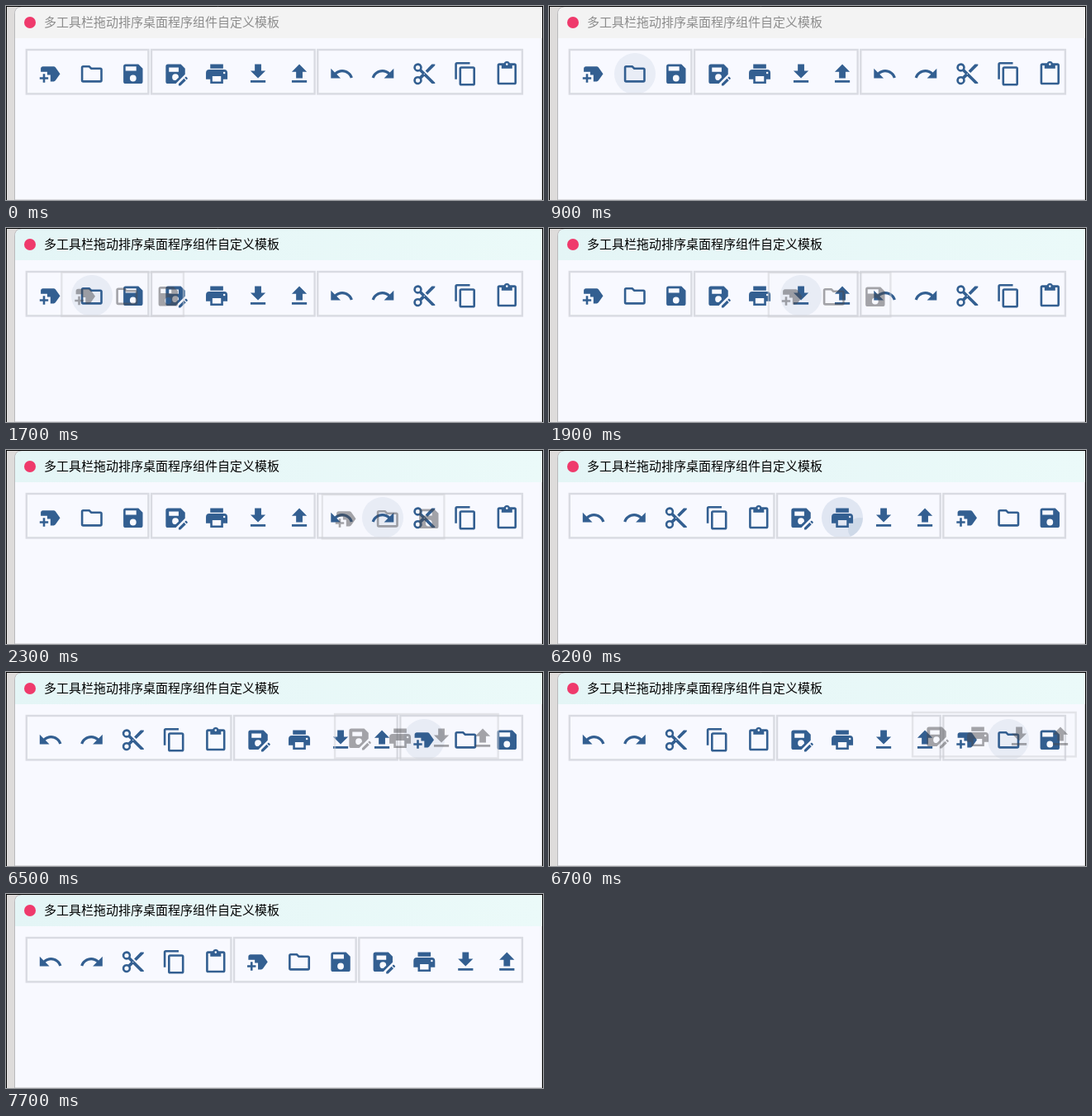
Animation, 650 px wide and 235 px high, one loop 8 s. Source, as an HTML page:

```html
<!DOCTYPE html>
<html lang="zh">
<head>
<meta charset="utf-8">
<style>
  html, body { margin: 0; width: 100%; height: 100%; overflow: hidden; background: #000; }
  svg { display: block; }
  #title { font: 15px "Noto Sans CJK SC", "Noto Sans CJK", sans-serif; }
  .box { fill: none; stroke: #d9dbe2; stroke-width: 2.4; }
  .icon { fill: #335f91; fill-rule: evenodd; }
  #ghost { opacity: .48; }
  #ghost .box { stroke: #cdced3; fill: rgba(0, 0, 0, .015); }
  #ghost .icon { fill: #48484c; }
</style>
</head>
<body>
<svg width="650" height="235" viewBox="0 0 650 235">
  <defs>
    <linearGradient id="tint">
      <stop stop-color="#e4f5f6"/>
      <stop offset="1" stop-color="#ebfaf9"/>
    </linearGradient>
    <clipPath id="hoverClip"><circle id="clipCircle" cy="82" r="25"/></clipPath>
  </defs>
  <path d="M1 1H649V235H1Z" fill="#dedcdb"/>
  <path d="M10.5 235V10Q10.5 1 19 1H649V235Z" fill="#f8f9ff" stroke="#b9b9bb"/>
  <path id="titleBar" d="M11 39V10Q11 1.5 19 1.5H649V39Z"/>
  <path d="M649.5 0V235M0 .5H650" stroke="#000"/>
  <circle cx="29" cy="20" r="7" fill="#ef3a6c"/>
  <text id="title" x="46" y="25">多工具栏拖动排序桌面程序组件自定义模板</text>
  <circle id="hover" cy="82" r="25" fill="#335f91"/>
  <g clip-path="url(#hoverClip)"><circle id="ripple" fill="#335f91" fill-opacity=".1"/></g>
  <g id="bars"></g>
  <g id="ghost"></g>
</svg>
<script>
const icons = {
  label: 'M21 12l-4.37 6.16c-.37.52-.98.84-1.63.84h-3v-6H9v-3H3V7c0-1.1.9-2 2-2h10c.65 0 1.26.31 1.63.84zM10 15H7v-3H5v3H2v2h3v3h2v-3h3z',
  folder: 'M9.17 6l2 2H20v10H4V6zM10 4H4a2 2 0 0 0-2 2v12a2 2 0 0 0 2 2h16a2 2 0 0 0 2-2V8a2 2 0 0 0-2-2h-8z',
  save: 'M17 3H5a2 2 0 0 0-2 2v14a2 2 0 0 0 2 2h14a2 2 0 0 0 2-2V7zM12 19a3 3 0 1 1 0-6 3 3 0 0 1 0 6zM15 9H5V5h10z',
  saveAs: 'M21 12.4V7l-4-4H5a2 2 0 0 0-2 2v14a2 2 0 0 0 2 2h7.4zM15 15l-.04.45L12.3 18H12a3 3 0 1 1 3-3zM6 6h9v4H6zM19.99 16.25l1.77 1.77L16.77 23H15v-1.77zM23.25 16.51l-.85.85-1.77-1.77.85-.85q.35-.3.71 0l1.06 1.06q.3.35 0 .71z',
  print: 'M19 8H5a3 3 0 0 0-3 3v6h4v4h12v-4h4v-6a3 3 0 0 0-3-3zM16 19H8v-5h8zM19 12a1 1 0 1 1 0-2 1 1 0 0 1 0 2zM18 3H6v4h12z',
  download: 'M5 20h14v-2H5zM19 9h-4V3H9v6H5l7 7z',
  upload: 'M5 20h14v-2H5zM5 10h4v6h6v-6h4l-7-7z',
  undo: 'M12.5 8c-2.65 0-5.05.99-6.9 2.6L2 7v9h9l-3.62-3.62c1.39-1.16 3.16-1.88 5.12-1.88 3.54 0 6.55 2.31 7.6 5.5l2.37-.78C21.08 11.03 17.15 8 12.5 8z',
  redo: 'M18.4 10.6C16.55 8.99 14.15 8 11.5 8c-4.65 0-8.58 3.03-9.96 7.22L3.9 16c1.05-3.19 4.05-5.5 7.6-5.5 1.95 0 3.73.72 5.12 1.88L13 16h9V7z',
  cut: 'M9.64 7.64A4 4 0 1 0 7.64 9.64L10 12l-2.36 2.36a4 4 0 1 0 2 2L12 14l7 7h3v-1zM6 8a2 2 0 1 1 0-4 2 2 0 0 1 0 4zM6 20a2 2 0 1 1 0-4 2 2 0 0 1 0 4zM12 12.5a.5.5 0 1 1 0-1 .5.5 0 0 1 0 1zM19 3l-6 6 2 2 7-7V3z',
  copy: 'M16 1H4a2 2 0 0 0-2 2v14h2V3h12zM19 5H8a2 2 0 0 0-2 2v14a2 2 0 0 0 2 2h11a2 2 0 0 0 2-2V7a2 2 0 0 0-2-2zM19 21H8V7h11z',
  paste: 'M19 2h-4.18a3 3 0 0 0-5.64 0H5a2 2 0 0 0-2 2v16a2 2 0 0 0 2 2h14a2 2 0 0 0 2-2V4a2 2 0 0 0-2-2zM12 2a1 1 0 1 1 0 2 1 1 0 0 1 0-2zM19 20H5V4h2v3h10V4h2z'
};
const toolbars = {
  A: ['label', 'folder', 'save'],
  B: ['saveAs', 'print', 'download', 'upload'],
  C: ['undo', 'redo', 'cut', 'copy', 'paste']
};

// Each step holds until the next one; drag = [toolbar, dx, dy], ripple = [x, y, radius]
const steps = [
  { at: 0, order: 'ABC' },
  { at: 900, order: 'ABC', hover: 104 },
  { at: 1500, order: 'ABC', hover: 104, ripple: [85, 95, 8] },
  { at: 1600, order: 'ABC', hover: 104, ripple: [85, 95, 16], drag: ['A', 8, 0] },
  { at: 1700, order: 'ABC', hover: 104, drag: ['A', 42.5, .5] },
  { at: 1800, order: 'ABC', hover: 205, drag: ['A', 136, 1] },
  { at: 1900, order: 'ABC', hover: 305, drag: ['A', 241, 1] },
  { at: 2000, order: 'ABC', hover: 406, drag: ['A', 308, 1] },
  { at: 2100, order: 'ABC', hover: 406, drag: ['A', 338, 1] },
  { at: 2300, order: 'ABC', hover: 456, drag: ['A', 358, 1] },
  { at: 2700, order: 'CBA' },
  { at: 6200, order: 'CBA', hover: 355, ripple: [376, 96, 14] },
  { at: 6300, order: 'CBA', hover: 355, ripple: [376, 96, 22], drag: ['B', 35, 0] },
  { at: 6400, order: 'CBA', hover: 455, drag: ['B', 80, -1] },
  { at: 6500, order: 'CBA', hover: 506, drag: ['B', 122, -2] },
  { at: 6600, order: 'CBA', hover: 506, drag: ['B', 150, -3] },
  { at: 6700, order: 'CBA', hover: 556, drag: ['B', 164, -4] },
  { at: 7700, order: 'CAB' }
];

const $ = id => document.getElementById(id);
const set = (id, attrs) => {
  for (const name in attrs) $(id).setAttribute(name, attrs[name]);
};

function toolbar(key, x, y = 0) {
  const names = toolbars[key];
  const drawn = names.map((name, i) =>
    `<path class="icon" transform="translate(${14.6 + 50 * i} 66.7) scale(1.3)" d="${icons[name]}"/>`);
  return `<g transform="translate(${x} ${y})">
    <rect class="box" x="1.2" y="53" width="${50 * names.length - 2.4}" height="53.4"/>${drawn.join('')}</g>`;
}

function show({ at, order, hover, ripple, drag }) {
  const active = at >= 1500;
  set('titleBar', { fill: active ? 'url(#tint)' : '#f3f3f3' });
  set('title', { fill: active ? '#000' : '#8d8d8d' });
  set('hover', { cx: hover || 0, 'fill-opacity': !hover ? 0 : ripple ? .12 : .08 });
  set('clipCircle', { cx: hover || 0 });
  const [cx, cy, r] = ripple || [0, 0, 0];
  set('ripple', { cx, cy, r });

  let x = 23.6, bars = '', ghost = '';
  for (const key of order) {
    bars += toolbar(key, x);
    if (drag && drag[0] === key) ghost = toolbar(key, x + drag[1], drag[2]);
    x += 50 * toolbars[key].length + 1.25;
  }
  $('bars').innerHTML = bars;
  $('ghost').innerHTML = ghost;
}

let current;
function tick() {
  const time = performance.now() % 8000;
  const step = steps.findLast(s => s.at <= time);
  if (step !== current) show(current = step);
  requestAnimationFrame(tick);
}
tick();
</script>
</body>
</html>
```
